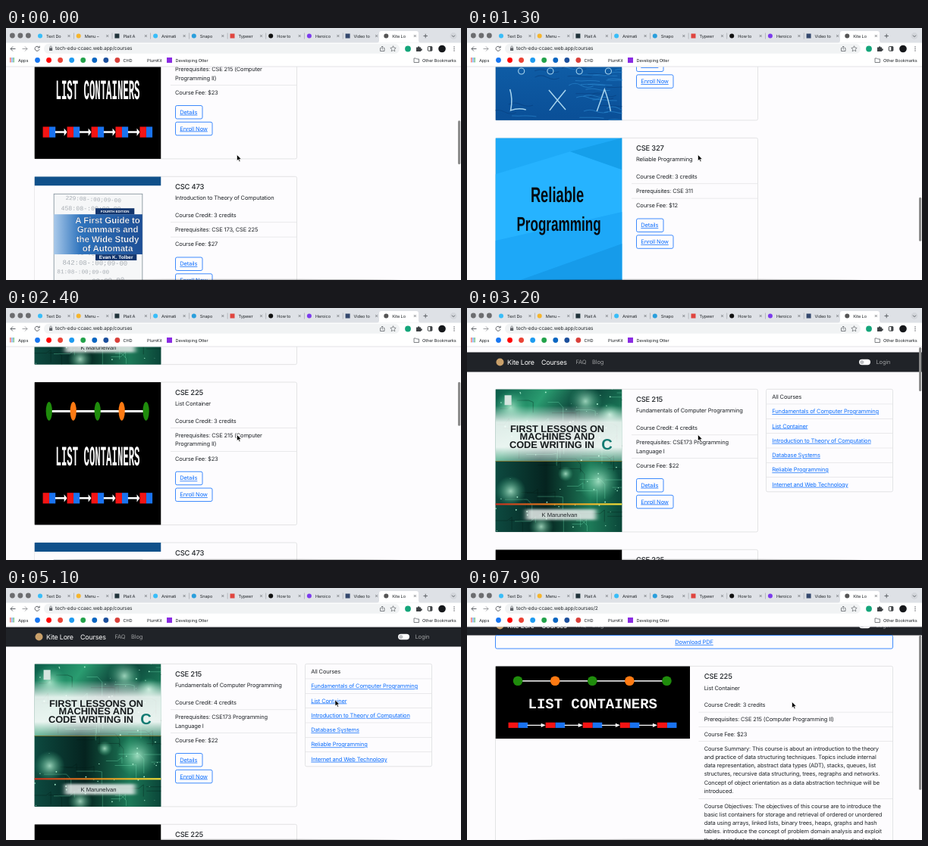
These frames come from a looping animation (600x333 px, 8000 ms). An HTML page:

```html
<!DOCTYPE html>
<html lang="en">
<head>
<meta charset="utf-8">
<title>Course catalogue</title>
<style>
html, body { margin: 0; width: 100%; height: 100%; overflow: hidden; background: #fff; }
svg { display: block; }
#stage { width: 100vw; height: 100vh; }
text { font-family: Inter, Roboto, sans-serif; letter-spacing: -.02em; fill: #212529; white-space: pre; text-rendering: geometricPrecision; }
.link { fill: #0d6efd; text-decoration: underline; }
.mid { text-anchor: middle; }
.bold { font-family: "Liberation Sans", Arial, sans-serif; font-weight: 700; letter-spacing: 0; }
.mono { font-family: "Liberation Mono", monospace; font-weight: 700; letter-spacing: 0; }
.white { fill: #fff; }
.dim { fill: #9b9d9f; }
.line { fill: none; stroke: #5f6368; stroke-width: 1; }
</style>
</head>
<body>
<svg id="stage" viewBox="0 0 600 333" preserveAspectRatio="none"></svg>
<script>
// Shape helpers; text is placed by the middle of its capitals.
const text = (x, y, size, str, attrs = '') =>
  `<text x="${x}" y="${y + size * .36}" font-size="${size}" ${attrs}>${str}</text>`;
const rect = (x, y, w, h, fill, attrs = '') =>
  `<rect x="${x}" y="${y}" width="${w}" height="${h}" fill="${fill}" ${attrs}/>`;
const dot = (x, y, r, fill) => `<circle cx="${x}" cy="${y}" r="${r}" fill="${fill}"/>`;
const path = (d, attrs = 'class="line"') => `<path d="${d}" ${attrs}/>`;
const PAGE = '#fdfcfe';
const box = (x, y, w, h, color = '#dcdddf') =>
  rect(x, y, w, h, PAGE, `rx="2" stroke="${color}" stroke-width=".8"`);
const rule = (x, y, w) => rect(x, y, w, .6, '#dcdddf');
const picture = (x, y, w, h, [vw, vh, body]) =>
  `<svg x="${x}" y="${y}" width="${w}" height="${h}" viewBox="0 0 ${vw} ${vh}" preserveAspectRatio="none">${body}</svg>`;
const repeat = (n, f) => Array.from({ length: n }, (_, i) => f(i)).join('');

let seed = 7;
const rnd = (a, b) => {
  seed = seed * 16807 % 2147483647;
  return +(a + (b - a) * seed / 2147483647).toFixed(1);
};

const BODY = 7.5;
const defs = `<defs>
  <linearGradient id="circuit" x2="1" y2=".8"><stop stop-color="#0a5a48"/><stop offset=".25" stop-color="#2a9c70"/>
    <stop offset=".45" stop-color="#0a3d35"/><stop offset=".75" stop-color="#1f8a62"/><stop offset="1" stop-color="#0a4a3c"/></linearGradient>
  <linearGradient id="board"><stop stop-color="#0d4a40"/><stop offset=".4" stop-color="#05231f"/>
    <stop offset=".75" stop-color="#1d7a58"/><stop offset="1" stop-color="#0a4538"/></linearGradient>
  <linearGradient id="band" x2="0" y2="1"><stop stop-color="#fff" stop-opacity="0"/><stop offset=".3" stop-color="#fff" stop-opacity=".85"/>
    <stop offset=".75" stop-color="#fff" stop-opacity=".9"/><stop offset="1" stop-color="#e4f1ec" stop-opacity=".35"/></linearGradient>
  <linearGradient id="stripe"><stop stop-color="#c5301f"/><stop offset=".5" stop-color="#e08a1c"/><stop offset="1" stop-color="#f2df3a"/></linearGradient>
  <radialGradient id="glow"><stop stop-color="#c8ffe2" stop-opacity=".75"/><stop offset="1" stop-color="#3fc08a" stop-opacity="0"/></radialGradient>
  <linearGradient id="cover"><stop stop-color="#a9c9ea"/><stop offset=".3" stop-color="#2f74bd"/><stop offset="1" stop-color="#1e4f96"/></linearGradient>
  <linearGradient id="sea" x2="0" y2="1"><stop stop-color="#1672bd"/><stop offset="1" stop-color="#0a4f97"/></linearGradient>
  <filter id="soft" x="-.1" y="-2" width="1.2" height="5"><feGaussianBlur stdDeviation="3 .5"/></filter>
  <filter id="haze" x="-.2" y="-.5" width="1.4" height="2"><feGaussianBlur stdDeviation="3 1.500"/></filter>
</defs>`;

const circuitBook = [166, 189,
  rect(0, 0, 166, 189, 'url(#circuit)') + rect(0, 95, 166, 94, 'url(#board)') +
  repeat(50, () => path(`M${rnd(0, 166)} ${rnd(0, 189)}h${rnd(8, 34)}l6 ${rnd(-8, 8)}v${rnd(4, 22)}`,
    `fill="none" stroke="${rnd(0, 1) > .5 ? '#6fe0b0' : '#021a16'}" stroke-opacity=".4" stroke-width=".9"`)) +
  [[20, 24, 22], [118, 16, 22], [150, 34, 16], [20, 135, 20], [135, 122, 28], [92, 112, 10], [60, 182, 16]]
    .map(([x, y, r]) => dot(x, y, r, 'url(#glow)')).join('') +
  repeat(60, () => dot(rnd(0, 166), rnd(0, 189), rnd(.4, 1.1), '#a8f0ce')) +
  rect(0, 22, 166, 73, 'url(#band)') +
  rect(0, 95, 166, .8, '#8d7a2c') + rect(0, 151.2, 166, 2.2, 'url(#stripe)') +
  rect(40, 159, 92, 14, '#e9eeec', 'opacity=".85" filter="url(#haze)"') +
  rect(12, 8, 9, 13, '#d5e5df') +
  ['FIRST LESSONS ON', 'MACHINES AND', 'CODE WRITING IN'].map((s, i) =>
    text(i == 2 ? 74 : 81, 52 + 10.6 * i, 12.7, s, 'class="bold mid" style="fill:#14191b"')).join('') +
  text(139, 73, 20, 'C', 'class="bold" style="fill:#117a72"') +
  text(84, 166.5, 7.6, 'K Marunelvan', 'class="bold mid" style="font-weight:400"')];

const nodes = [256, 96,
  rect(0, 0, 256, 96, '#000') + rect(29, 18.8, 197, 1.5, '#fff') +
  repeat(5, i => dot(29.5 + 49 * i, 19.5, 6.3, i % 2 ? '#ff7a12' : '#1f8c0c')) +
  text(128, 49, 18.9, 'LIST CONTAINERS', 'class="mono mid white"') +
  repeat(5, i => {
    const x = 17 + 49 * i;
    return rect(x, 74.4, 13, 7.2, '#f41414') + rect(x + 13, 74.4, 12.5, 7.2, '#1a73f0') +
      (i < 4 ? path(`M${x + 25} 77.400h18v-2l6 2.600-6 2.600v-2h-18z`, 'fill="#fff"') : '');
  })];

const codeBook = [166, 189,
  rect(0, 0, 166, 189, PAGE) + rect(0, 0, 166, 12, '#10508a') +
  rect(25.5, 23, 116, 166, '#f6f7f8', 'stroke="#7d8a96" stroke-width=".8"') +
  repeat(14, i => `<g transform="rotate(${rnd(-4, 4)} 83 ${30 + 12 * i})">` +
    text(rnd(27, 44), 30 + 12 * i, rnd(7, 10), `${(i * 229 + 229) % 990}:08-:00;09-00`,
      'class="mono" style="fill:#a7adb3;font-weight:400"') + '</g>') +
  rect(25.5, 50, 116, 53, 'url(#cover)') +
  rect(80, 42, 51, 8, '#12356d') + text(105.5, 46, 4.4, 'FOURTH EDITION', 'class="bold mid white"') +
  ['A First Guide to', 'Grammars and', 'the Wide Study', 'of Automata'].map((s, i) =>
    text(96, 57.5 + 12.4 * i, 11.4, s, 'class="bold mid white" stroke="#17386b" stroke-width=".25"')).join('') +
  rect(80, 103, 54, 8, '#12356d') + text(107, 107, 6.4, 'Evan K. Tolber', 'class="bold mid white"')];

const chalk = [166, 189,
  rect(0, 0, 166, 189, 'url(#sea)') +
  repeat(90, () => path(`M${rnd(-10, 160)} ${rnd(0, 189)}q8 ${rnd(-5, 1)} 16 0t16 1`,
    `fill="none" stroke="${rnd(0, 1) > .5 ? '#2c8bd2' : '#083e7d'}" stroke-opacity=".6"`)) +
  repeat(3, r => repeat(4, i => `<circle cx="${34 + 38 * i}" cy="${28 + 48 * r}" r="4" fill="none" stroke="#a6d4ee" stroke-width="1.1"/>`)) +
  path('M19 148q4 12 1 28q10-4 20-1M70 149q10 12 22 26M92 149q-10 12-21 27M133 177q5-14 10-29q5 13 8 29',
    'fill="none" stroke="#a6d4ee" stroke-width="1.5"')];

const facets = [166, 189,
  rect(0, 0, 166, 189, '#1eaaf7') +
  path('M0 48L98 18 166 42V189H0z', 'fill="#26b3ff"') +
  path('M98 18L166 0V42z', 'fill="#159fea"') +
  path('M0 189V136L166 98V189z', 'fill="#1da8f8"') +
  path('M30 189L166 140V189z', 'fill="#169bea"') +
  `<g transform="scale(1 1.550)">` +
  text(81, 48.3, 18.2, 'Reliable', 'class="bold mid" style="fill:#050b12"') +
  text(83, 73, 17, 'Programming', 'class="bold mid" style="fill:#050b12"') + '</g>'];

const button = (y, label, w) => box(223.5, y - 8.5, w, 17.5, '#0d6efd') + text(229.3, y, BODY, label, 'class="link"');

function card(i, code, name, credits, prereq, fee, art) {
  const y = 100 + 212 * i, shift = 11.5 * (prereq.length - 1);
  return box(37.5, y + .3, 346, 188.6) + picture(37.5, y + .3, 167, 188.6, art) +
    text(223, y + 13.5, 9.4, code, 'font-weight="500"') +
    text(223, y + 28.7, BODY, name) +
    text(223, y + 51.3, BODY, `Course Credit: ${credits} credits`) +
    rule(217, y + 60.5, 166) +
    prereq.map((s, k) => text(223, y + 70.5 + 11.5 * k, BODY, s)).join('') +
    rule(217, y + 79.8 + shift, 166) +
    text(223, y + 89.7 + shift, BODY, `Course Fee: $${fee}`) +
    button(y + 115.5 + shift, 'Details', 35.5) + button(y + 137.3 + shift, 'Enroll Now', 48.5);
}

const nav = rect(0, 51.5, 600, 26, '#202328') + dot(43.5, 64.5, 5, '#c9a06a') +
  text(53, 64.5, 8.9, 'Kite Lore', 'class="white"') + text(98, 64.5, 8.9, 'Courses', 'class="white"') +
  text(143.5, 64.5, BODY, 'FAQ', 'class="dim"') + text(165, 64.5, BODY, 'Blog', 'class="dim"') +
  rect(517, 60.8, 15, 7.4, '#fff', 'rx="3.7"') + dot(520.8, 64.5, 2.6, '#bfc1c4') +
  text(539.5, 64.5, BODY, 'Login', 'class="dim"');

const courses = ['All Courses', 'Fundamentals of Computer Programming', 'List Container',
  'Introduction to Theory of Computation', 'Database Systems', 'Reliable Programming', 'Internet and Web Technology'];

const listPage = nav +
  card(0, 'CSE 215', courses[1], 4, ['Prerequisites: CSE173 Programming', 'Language I'], 22, circuitBook) +
  card(1, 'CSE 225', courses[2], 3, ['Prerequisites: CSE 215 (Computer', 'Programming II)'], 23, nodes) +
  card(2, 'CSC 473', courses[3], 3, ['Prerequisites: CSE 173, CSE 225'], 27, codeBook) +
  card(3, 'CSE 311', courses[4], 3, ['Prerequisites: CSE 225'], 25, chalk) +
  card(4, 'CSE 327', courses[5], 3, ['Prerequisites: CSE 311'], 12, facets) +
  box(394.5, 100.3, 167, 135.5) +
  courses.map((s, i) => text(402.3, 110.2 + 19.3 * i, BODY, s, i ? 'class="link"' : '') +
    (i ? rule(395, 100.3 + 19.35 * i, 166) : '')).join('');

const details = [
  [169.5, 'Course Credit: 3 credits'],
  [188.5, 'Prerequisites: CSE 215 (Computer Programming II)'],
  [208, 'Course Fee: $23'],
  [227, 'Course Summary: This course is about an introduction to the theory',
    'and practice of data structuring techniques. Topics include internal',
    'data representation, abstract data types (ADT), stacks, queues, list',
    'structures, recursive data structuring, trees, regraphs and networks.',
    'Concept of object orientation as a data abstraction technique will be', 'introduced.'],
  [303, 'Course Objectives: The objectives of this course are to introduce the',
    'basic list containers for storage and retrieval of ordered or unordered',
    'data using arrays, linked lists, binary trees, heaps, graphs and hash',
    'tables. introduce the concept of problem domain analysis and exploit',
    'the domain features to improve data handling efficiency, develop the']];

const detailPage = nav + box(37.5, 77.5, 524, 17.6, '#0d6efd') +
  text(299.5, 86.2, BODY, 'Download PDF', 'class="link mid"') +
  box(37.5, 118.3, 524, 260) + picture(37.5, 118.3, 256.5, 96, nodes) +
  text(312.7, 131.7, 9.4, 'CSE 225', 'font-weight="500"') + text(312.7, 147, BODY, courses[2]) +
  details.map(([y, ...lines], i) => (i ? rule(305.5, y - 9.7, 256) : '') +
    lines.map((s, k) => text(312.7, y + 11.25 * k, BODY, s)).join('')).join('');

const tabs = [['Text Do', '#38bdf8'], ['Menu –', '#f5b52e'], ['Plait A', '#20333a'], ['Animati', '#38bdf8'], ['Snapo', '#2a9fdc'],
  ['Typewr', '#e0453f'], ['How to', '#111'], ['Heroico', '#7c3aed'], ['Video to', '#34486e'], ['Kite Lo', '#555']];
const marks = ['#1877f2', '#f00', '#ea4335', '#1d9bf0', '#22a24a', '#0a66c2', '#1b4f9c', '#d9403a'];

const chrome = rect(0, 0, 600, 51, '#fff') + rect(0, 0, 600, 19.5, '#dee1e6') +
  repeat(3, i => dot(8.4 + 10.5 * i, 10, 3.4, '#6c6d70')) +
  path('M489 19.5q3 0 3-3V7q0-3 3-3H541q3 0 3 3v9.500q0 3 3 3z', 'fill="#fff"') +
  tabs.map(([name, color], i) => {
    const x = 45 + 50.7 * i;
    return (i % 3 == 2 ? rect(x - 3, 7.5, 6, 6, color) : dot(x, 10.5, 3, color)) +
      text(x + 8, 10.5, 5.63, name) +
      path(`M${x + 36.5} 9l3 3m0-3l-3 3`, 'stroke="#5f6368" stroke-width=".7"') +
      (i < 8 ? rect(x + 44, 6.5, .6, 8, '#9a9da2') : '');
  }).join('') +
  path('M550.500 10.500h5.400m-2.700-2.700v5.400') + dot(590, 10.5, 4.4, '#d3d6db') + path('M588 9.700l2 2 2-2') +
  path('M12.500 27.500h-6.500m3-3l-3 3 3 3') + path('M21.500 27.500h6.500m-3-3l3 3-3 3', 'class="line" opacity=".6"') +
  path('M43.500 25.500a3 3 0 1 0 .5 2.500M44.200 23.700v2.300h-2.500') +
  rect(50, 20.8, 469, 13, '#f1f3f4', 'rx="6.5"') +
  rect(57, 26.3, 4.2, 3.6, '#5f6368', 'rx=".5"') + path('M57.900 26.500v-1.300a1.200 1.200 0 0 1 2.400 0v1.300', 'class="line" style="stroke-width:.7"') +
  '<text id="url" x="65" y="29.3" font-size="6.56"></text>' +
  path('M494.500 26.500h-1v4h5.500v-4h-1m-1.800 2v-4.500m-1.500 1.500l1.500-1.500 1.500 1.500', 'class="line" style="stroke-width:.8"') +
  path('M510.500 23.700l1.100 2.400 2.600.3-1.900 1.800.5 2.600-2.300-1.300-2.300 1.300.5-2.600-1.900-1.800 2.600-.3z', 'class="line" style="stroke-width:.7"') +
  dot(530, 27.5, 3.9, '#15a67b') +
  path('M541 25.500h2a1.200 1.200 0 1 1 2.400 0h1.700v2a1.200 1.200 0 1 1 0 2.200v1.300h-6.100z', 'fill="#3c4043"') +
  rect(556.3, 24.6, 5.6, 5.6, 'none', 'rx=".8" stroke="#3c4043"') + rect(559.3, 24.6, 2.6, 5.6, '#3c4043') +
  dot(575, 27.5, 4.8, '#16181b') + repeat(3, i => dot(591, 25 + 2.5 * i, .75, '#5f6368')) +
  repeat(9, i => rect(5 + 2.2 * (i % 3), 39.3 + 2.2 * (i / 3 | 0), 1.5, 1.5, ['#ea4335', '#4285f4', '#34a853'][i % 3])) +
  text(16, 42.5, 5.63, 'Apps') +
  marks.map((c, i) => dot(41.5 + 15.05 * i, 42.5, 3.4, c)).join('') +
  text(154.5, 42.5, 5.63, 'CHD') + text(186, 42.5, 5.63, 'PlumKit') +
  rect(212, 39, 7, 7, '#8a2be2') + text(223.5, 42.5, 5.63, 'Developing Otter') +
  path('M538 40h2.500l1 1h3v4.500h-6.500z', 'class="line" style="stroke-width:.8"') + text(549, 42.5, 5.63, 'Other Bookmarks') +
  rect(0, 50.5, 600, 1, '#e3e4e8');

const stage = document.getElementById('stage');
stage.innerHTML = defs + rect(0, 0, 600, 333, PAGE) +
  `<g id="list">${listPage}</g><g id="detail">${detailPage}</g>` +
  rect(596, 0, 3.2, 58, '#8c8c8c', 'id="thumb" rx="1.6"') + chrome +
  '<ellipse cx="299" cy="333" rx="222" ry="1.3" opacity=".25" filter="url(#soft)"/>' +
  `<g id="status">${rect(-2, 323, 120.5, 12, '#dfe1e5', 'rx="2" stroke="#c3c6ca" stroke-width=".5"')}` +
  text(1.5, 328.3, 5.63, 'https://tech-edu-ccaec.web.app/courses/2', 'style="fill:#4a4d51"') + '</g>' +
  `<g id="cursor">${path('M0 0V8l1.900-1.700 1.300 2.900 1.300-.6-1.300-2.800h2.600z', 'id="arrow" stroke="#fff" stroke-width=".6"')}` +
  path('M-.8 1q0-1.200.9-1.200t.9 1.200v2.500l2.700.7q1 .3.8 1.400l-.6 2.700h-3.900l-2.300-3q-.1-1 1.500-.2z', 'id="hand" fill="#fff" stroke="#000" stroke-width=".7"') + '</g>';

const get = id => document.getElementById(id);
const show = (id, on) => get(id).setAttribute('visibility', on ? 'visible' : 'hidden');
const move = (id, x, y) => get(id).setAttribute('transform', `translate(${x} ${y})`);

// Eased value from [time, value] keys.
function track(keys, t) {
  const i = keys.findIndex(k => k[0] > t);
  if (i < 0) return keys[keys.length - 1][1];
  if (!i) return keys[0][1];
  const [t0, a] = keys[i - 1], [t1, b] = keys[i], u = (t - t0) / (t1 - t0);
  return a + (b - a) * u * u * (3 - 2 * u);
}

const CLICK = 7000;
const listScroll = [[0, 328], [1300, 803], [2976, -7], [3200, -7], [3500, 0]];
const detailScroll = [[7300, 0], [7900, 15]];
const cursorX = [[3700, 304.5], [5000, 434], [5100, 434], [5600, 428.5]];
const cursorY = [[3700, 167.5], [5000, 148], [5100, 148], [5600, 150.5]];
const thumbFade = [[3700, 1], [4000, 0], [7300, 0], [7400, 1]];

function draw() {
  const t = Math.floor(performance.now() % 8000 / 100) * 100;
  const opened = t >= CLICK, hover = t >= 5500 && !opened;
  const scroll = track(opened ? detailScroll : listScroll, t);

  show('list', !opened);
  show('detail', opened);
  move(opened ? 'detail' : 'list', 0, -scroll);

  get('thumb').setAttribute('y', 52 + Math.max(0, scroll) * (opened ? .72 : .214));
  get('thumb').setAttribute('height', opened ? 204 : 58);
  get('thumb').setAttribute('opacity', track(thumbFade, t));

  get('url').textContent = 'tech-edu-ccaec.web.app/courses' + (opened ? '/2' : '');
  show('status', hover);
  show('hand', hover);
  show('arrow', !hover);
  move('cursor', track(cursorX, t), track(cursorY, t));
  requestAnimationFrame(draw);
}
draw();
</script>
</body>
</html>
```
